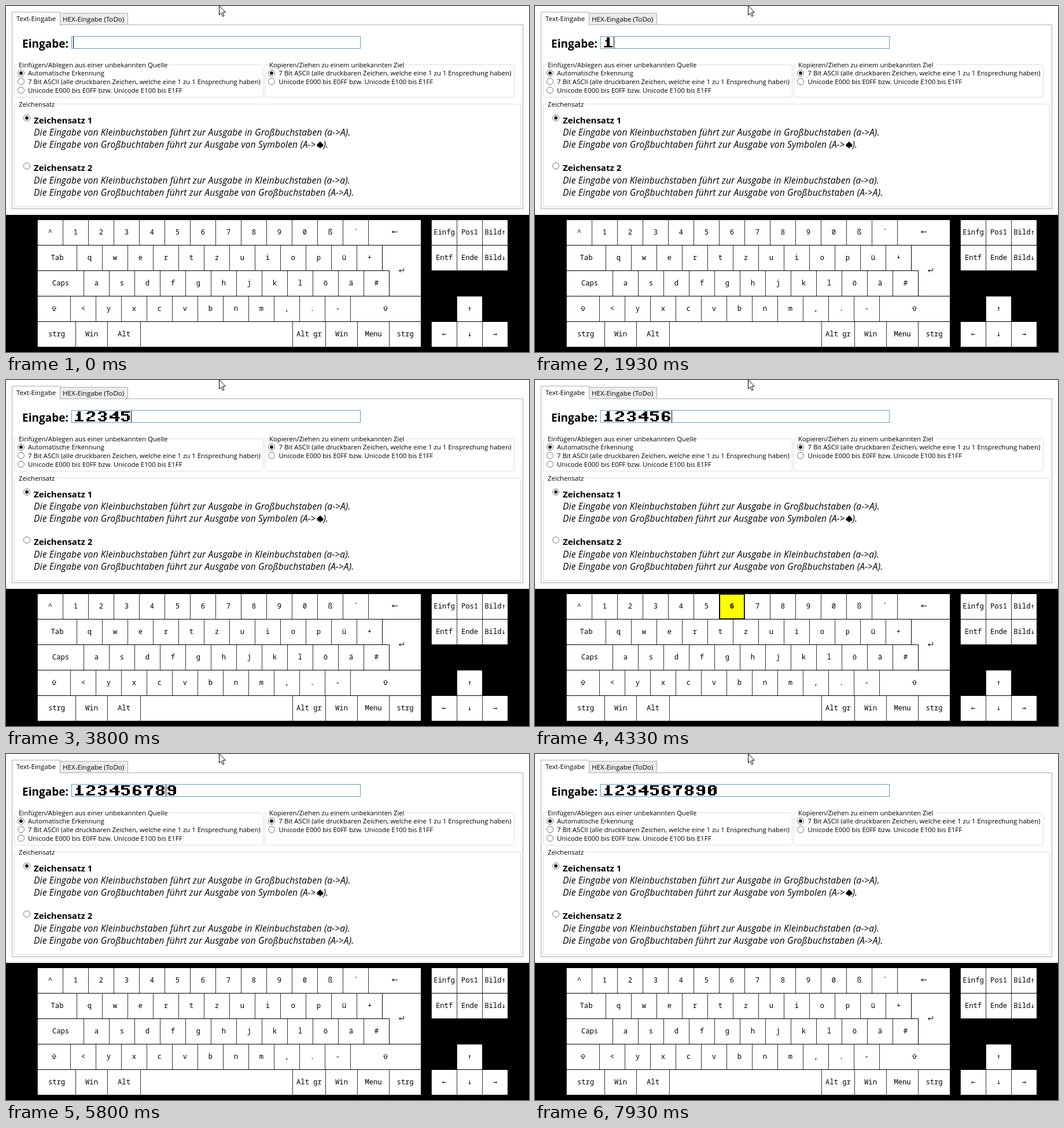
Animation of 904 by 598 pixels, one loop 8000 ms. Source, as an HTML page:

```html
<!DOCTYPE html>
<html lang="de">
<head>
<meta charset="utf-8">
<title>Tastatureingabe</title>
<style>
html, body { margin: 0; width: 100%; height: 100%; overflow: hidden; background: #fff; }
svg { display: block; width: 904px; height: 598px; }
text { font-family: "Open Sans", "Noto Sans", sans-serif; font-size: 11.4px; fill: #000; white-space: pre; }
.key { font: 12.2px "Noto Sans Mono", "DejaVu Sans Mono", monospace; text-anchor: middle; }
.arrow { font-family: "DejaVu Sans Mono", monospace; }
.title { font-weight: 700; font-size: 19px; }
.head { font-weight: 700; font-size: 15px; }
.note { font-style: italic; font-size: 15.6px; letter-spacing: .15px; }
</style>
</head>
<body>
<svg id="stage" viewBox="0 0 904 598" xmlns="http://www.w3.org/2000/svg"></svg>
<script>
const NS = "http://www.w3.org/2000/svg";
const stage = document.getElementById("stage");

function add(tag, attrs, content, parent = stage) {
  const el = document.createElementNS(NS, tag);
  for (const name in attrs) el.setAttribute(name, attrs[name]);
  if (content !== undefined) el.textContent = content;
  parent.appendChild(el);
  return el;
}
const rect = (x, y, width, height, fill, stroke = "none", rx = 0) =>
  add("rect", { x, y, width, height, fill, stroke, rx });
const path = (d, fill, stroke = "none") => add("path", { d, fill, stroke });
const label = (x, y, str, size) =>
  add("text", size ? { x, y, style: `font-size:${size}px` } : { x, y }, str);
const styled = (cls, x, y, str) => add("text", { x, y, class: cls }, str);

function radio(x, y, on) {
  add("circle", { cx: x, cy: y, r: 5.5, fill: "#fff", stroke: "#707070" });
  if (on) add("circle", { cx: x, cy: y, r: 3, fill: "#212121" });
}

function group(x, y, w, h, title, gap, size) {
  rect(x + .5, y + .5, w, h, "none", "#d5dfe5", 3);
  rect(x + 6, y, gap, 2, "#fff");
  label(x + 8, y + 5, title, size);
}

// Tabs and panel
rect(10.5, 32.5, 883, 318, "#fff", "#acacac");
rect(93.5, 12.5, 117, 20, "#ececec", "#acacac");
path("M10.5 33.5V10.5H93.5V33.5", "#fff", "#acacac");
rect(11, 31, 82, 3, "#fff");
label(18, 26, "Text-Eingabe", 11.5);
label(98, 27, "HEX-Eingabe (ToDo)", 11.6);

// Input line
styled("title", 28, 72, "Eingabe:");
rect(113.5, 52.5, 499, 21, "#fff", "#5c9bd0");

// Option groups
group(14, 101, 430, 56, "Einfügen/Ablegen aus einer unbekannten Quelle", 262);
group(447, 101, 431, 56, "Kopieren/Ziehen zu einem unbekannten Ziel", 240, 11.3);
group(14, 169, 875, 177, "Zeichensatz", 68, 11.3);
const ascii = "7 Bit ASCII (alle druckbaren Zeichen, welche eine 1 zu 1 Ensprechung haben)";
const unicode = "Unicode E000 bis E0FF bzw. Unicode E100 bis E1FF";
radio(26, 116, true);
label(38, 120, "Automatische Erkennung", 11.25);
radio(26, 130.5);
label(38, 135, ascii);
radio(26, 145.5);
label(38, 150, unicode);
radio(459, 116, true);
label(471.5, 120, ascii);
radio(459, 130.5);
label(471.5, 135, unicode);

// Character sets
radio(36, 193.5, true);
styled("head", 48, 203, "Zeichensatz 1");
styled("note", 48, 224, "Die Eingabe von Kleinbuchstaben führt zur Ausgabe in Großbuchstaben (a->A).");
styled("note", 48, 245, "Die Eingabe von Großbuchtaben führt zur Ausgabe von Symbolen (A->");
path("M543 234C541 237 537.5 238 537.5 241A2.7 2.7 0 0 0 542.2 242.8Q542 245 540.5 245.5H545.5Q544 245 543.8 242.8A2.7 2.7 0 0 0 548.5 241C548.5 238 545 237 543 234Z", "#000");
styled("note", 548.5, 245, ").");
radio(36, 276.5);
styled("head", 48, 285, "Zeichensatz 2");
styled("note", 48, 307, "Die Eingabe von Kleinbuchstaben führt zur Ausgabe in Kleinbuchstaben (a->a).");
styled("note", 48, 328, "Die Eingabe von Großbuchtaben führt zur Ausgabe von Großbuchstaben (A->A).");

// Keyboard
rect(0, 361, 904, 237, "#000");
const rowY = row => 370 + 44 * row;

function key(x, row, str, w = 43) {
  rect(x - 1, rowY(row), 1, 43, "#333");
  const face = rect(x, rowY(row), w, 43, "#fff");
  face.setAttribute("stroke-width", 2);
  const text = styled("key", x + w / 2, rowY(row) + 25);
  for (const part of str.split(/([←↑→↓])/).filter(Boolean))
    add("tspan", /[←↑→↓]/.test(part) ? { class: "arrow" } : {}, part, text);
  return { face, text };
}
const keyRun = (x, row, chars) => [...chars].map((c, i) => key(x + 44 * i, row, c));

function shiftKey(x, w) {
  key(x, 3, "", w);
  const cx = Math.floor(x + w / 2);
  path(`M${cx} 518.5l3.5 4h-2v4h-3v-4h-2z`, "none", "#000");
}

const topRow = keyRun(55, 0, "^1234567890ß´");
key(627, 0, "", 90);
path("M677 390.5H667.5M670.5 388L667.5 390.5L670.5 393", "none", "#000");

key(55, 1, "Tab", 67);
keyRun(123, 1, "qwertzuiopü+");
path("M651 414H717V501H663V457H651Z", "#fff");
path("M687.5 453V457.5H680M682.5 455L679.5 457.5L682.5 460", "none", "#000");

key(55, 2, "Caps", 79);
keyRun(135, 2, "asdfghjklöä#");

shiftKey(55, 56);
keyRun(112, 3, "<yxcvbnm,.-");
shiftKey(596, 121);

let left = 55;
for (const [str, w] of [["strg", 65], ["Win", 54], ["Alt", 56], ["", 262],
                        ["Alt gr", 56], ["Win", 54], ["Menu", 54], ["strg", 54]]) {
  key(left, 4, str, w);
  left += w + 1;
}
["Einfg", "Pos1", "Bild↑"].forEach((s, i) => key(736 + 44 * i, 0, s));
["Entf", "Ende", "Bild↓"].forEach((s, i) => key(736 + 44 * i, 1, s));
key(780, 3, "↑");
keyRun(736, 4, "←↓→");

// Typed digits, outlined on an 8 by 8 grid
const shapes = [
  "M3 0h2v6h2v1h-6v-1h2v-3h-1v-1h1z",
  "M2 0h4v1h1v2h-1v1h-2v1h-1v1h4v1h-6v-2h1v-1h2v-1h1v-2h-2v1h-2v-1h1z",
  "M2 0h4v1h1v2h-1v1h1v2h-1v1h-4v-1h-1v-1h2v1h2v-2h-2v-1h2v-2h-2v1h-2v-1h1z",
  "M5 0h2v4h1v1h-1v2h-2v-2h-4v-2h2v-1h1v-1h1zM3 3h2v1h-2z",
  "M1 0h6v1h-4v1h3v1h1v3h-1v1h-4v-1h-1v-1h2v1h2v-3h-4z",
  "M2 0h4v1h1v1h-2v-1h-2v2h3v1h1v2h-1v1h-4v-1h-1v-5h1zM3 4h2v2h-2z",
  "M1 0h6v2h-1v1h-1v4h-2v-4h1v-1h1v-1h-2v1h-2z",
  "M2 0h4v1h1v2h-1v1h1v2h-1v1h-4v-1h-1v-2h1v-1h-1v-2h1zM3 1h2v2h-2zM3 4h2v2h-2z",
  "M2 0h4v1h1v5h-1v1h-4v-1h-1v-1h2v1h2v-2h-3v-1h-1v-2h1zM3 1h2v2h-2z",
  "M2 0h4v1h1v5h-1v1h-4v-1h-1v-5h1zM3 1h2v1h-1v1h-1zM4 3h1v3h-2v-2h1z"
];
const digits = shapes.map((d, i) => add("path", {
  d, "fill-rule": "evenodd", transform: `translate(${116.5 + 20 * i} 54) scale(2.5)`
}));
const caret = rect(116, 53, 1, 20, "#000");

// Mouse pointer
path("M368.5 -.5V15.5L372 12.2L374.7 18L377 17L374.4 11H379.5Z", "#fff", "#000");

// Timeline in ms
const LOOP = 8000;
const typedAt = [1800, 2330, 2800, 3330, 3800, 4330, 4800, 5330, 5800, 6400];
const caretLag = { 8: 70 };
const caretOff = [[470, 1000], [1530, 1800], [6870, 7400], [7930, LOOP]];
// Position in the top row: [down, up]
const presses = {
  0: [1330, 1400], 1: [1800, 1930], 2: [2330, 2400], 3: [2800, 2930],
  4: [3330, 3400], 5: [3870, 3930], 6: [4330, 4400], 7: [4800, 4930],
  8: [5330, 5400], 9: [5870, 5930], 11: [6930, 7000], 12: [7460, 7600]
};
const within = (t, [from, to]) => t >= from && t < to;

function draw(t) {
  digits.forEach((d, i) => d.setAttribute("visibility", t >= typedAt[i] ? "visible" : "hidden"));
  const pos = typedAt.filter((at, i) => t >= at + (caretLag[i] || 0)).length;
  caret.setAttribute("x", 116 + 20 * pos);
  caret.setAttribute("visibility", caretOff.some(span => within(t, span)) ? "hidden" : "visible");
  topRow.forEach(({ face, text }, i) => {
    const down = presses[i] && within(t, presses[i]);
    face.setAttribute("fill", down ? "#ff0" : "#fff");
    face.setAttribute("stroke", down ? "#000" : "none");
    text.style.fontWeight = down ? 700 : 400;
  });
}

const start = performance.now();
function tick() {
  draw((performance.now() - start) % LOOP);
  requestAnimationFrame(tick);
}
tick();
</script>
</body>
</html>
```
